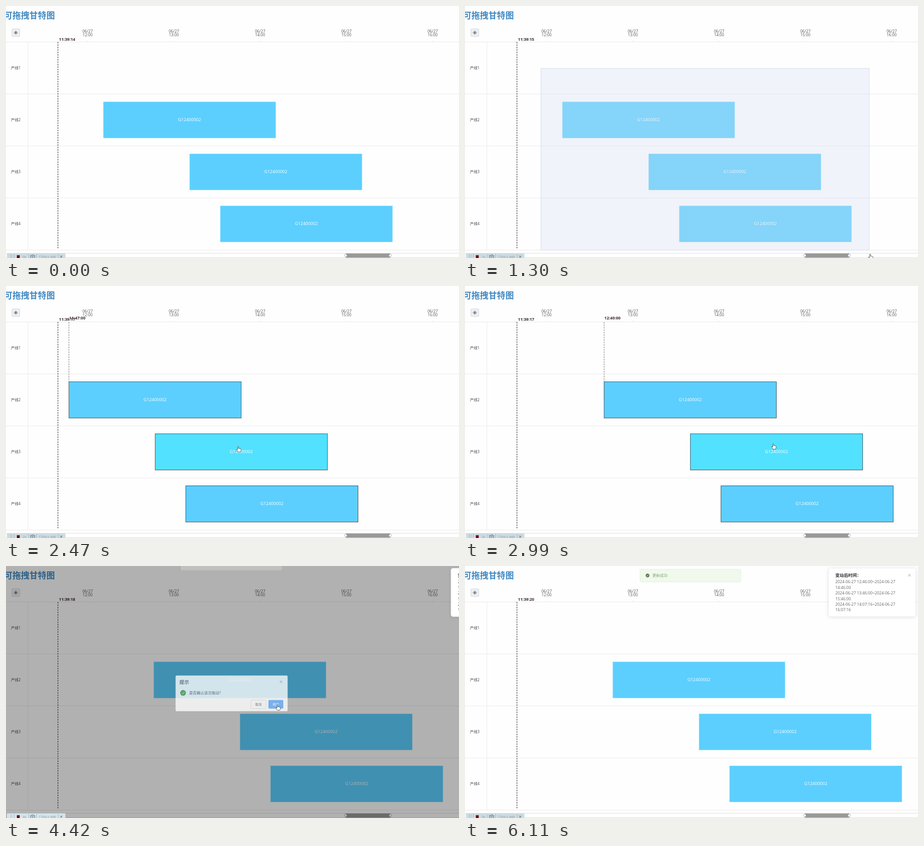
Write an HTML page that moves like this. It is 1003 px wide and 558 px high and loops after 6.24 s.

```html
<!DOCTYPE html>
<html lang="zh">
<head>
<meta charset="utf-8">
<title>可拖拽甘特图</title>
<style>
  html, body { margin: 0; width: 100%; height: 100%; overflow: hidden; background: #fefefe; }
  svg { display: block; width: 100vw; height: 100vh; }
  text { font-family: "Open Sans", "Noto Sans CJK SC", "Noto Sans CJK", sans-serif; }
  .mid { text-anchor: middle; }
  .bold { font-weight: 700; }
</style>
</head>
<body>
<svg id="stage" viewBox="0 0 1003 558" preserveAspectRatio="none"></svg>
<script>
const LOOP = 6240, STEP = 130;
const HOUR = 191, NOON = 180.7;
const ROWS = [79.5, 194.7, 309.8, 425, 540.5];
const BARS = [0, 60, 81.27];          // minutes after the first bar
const START = 11;                     // first bar begins at 12:11
const BAR_W = 381.4, BAR_H = 80.2;
const BRUSH = { x: 168, y: 138, bottom: 540.5 };

const clamp = v => Math.max(0, Math.min(1, v));
const smooth = v => { const p = clamp(v); return p * p * (3 - 2 * p); };
const easeOut = v => 1 - (1 - clamp(v)) ** 2;
const between = (t, a, b) => t >= a && t < b;
const minuteX = m => NOON + m * HOUR / 60;
const pad = n => String(n).padStart(2, '0');

// Keys are [time, value, value...]
function track(keys, t) {
  const next = keys.findIndex(k => k[0] > t);
  if (next === 0) return keys[0].slice(1);
  if (next < 0) return keys[keys.length - 1].slice(1);
  const a = keys[next - 1], b = keys[next];
  const p = smooth((t - a[0]) / (b[0] - a[0]));
  return a.slice(1).map((v, i) => v + (b[i + 1] - v) * p);
}

const text = (x, y, size, fill, str, cls = '', id = '') =>
  `<text x="${x}" y="${y}" font-size="${size}" fill="${fill}" class="${cls}" id="${id}">${str}</text>`;
const rect = (x, y, w, h, fill, more = '') =>
  `<rect x="${x}" y="${y}" width="${w}" height="${h}" fill="${fill}" ${more}/>`;
const path = (d, stroke, more = '') =>
  `<path d="${d}" fill="none" stroke="${stroke}" ${more}/>`;
const cross = (x, y, r, color) =>
  path(`M${x - r} ${y - r}l${2 * r} ${2 * r}m0 ${-2 * r}l${-2 * r} ${2 * r}`, color, 'stroke-width=".9"');
const check = (x, y, r, fill, id = '') =>
  `<circle id="${id}" cx="${x}" cy="${y}" r="${r}" fill="${fill}"/>` +
  path(`M${x - r * .42} ${y}l${r * .32} ${r * .34}l${r * .55} ${-r * .62}`, '#fff', 'stroke-width="1"');

function chart() {
  const hours = [12, 13, 14, 15, 16].map((h, i) => {
    const x = NOON + i * HOUR;
    return text(x, 58.8, 8.7, '#555', '06/27', 'mid') +
      text(x, 67.3, 8.7, '#555', h + ':00', 'mid') +
      path(`M${x} 77v2.5`, '#e0e2e8');
  }).join('');
  const lines = ROWS.map(y => path(`M0 ${y}H1003`, '#e8e9ed')).join('');
  const labels = [1, 2, 3, 4].map(n =>
    text(11, (ROWS[n - 1] + ROWS[n]) / 2 + 2.4, 8.2, '#444', '产线' + n)).join('');
  return text(-4.5, 28, 18.8, '#4189c2', '可拖拽甘特图', 'bold') +
    rect(13, 50.5, 17.5, 17, '#eceff3', 'rx="1.5" stroke="#d3d7dd"') +
    '<circle cx="21.7" cy="59" r="2.9" fill="none" stroke="#555" stroke-width=".8"/>' +
    '<circle cx="21.7" cy="59" r="1.5" fill="#444"/>' +
    path('M21.7 54.8v1.8m0 4.8v1.8M17.5 59h1.8m4.8 0h1.8', '#666', 'stroke-width=".8"') +
    hours + lines + path('M48.3 80V540', '#e8e9ed') + labels;
}

const bars = () => BARS.map((_, i) =>
  `<g id="bar${i}">${rect(0, 0, BAR_W, BAR_H, '#5ccfff')}` +
  text(BAR_W / 2, 42.7, 9.6, '#fff', 'G12400002', 'mid') + '</g>').join('');

const slider = () =>
  rect(-2, 547.6, 1008, 9.6, '#fff', 'stroke="#d8dde6"') +
  rect(752, 548, 99, 9.2, '#999') +
  [752, 851].map(x => `<circle cx="${x}" cy="552.4" r="2.9" fill="#fff" stroke="#b4bac4"/>`).join('');

const dialog = () =>
  rect(375.5, 0, 248, 79, '#fff', 'rx="2.5"') +
  text(384, 18.6, 10.7, '#303133', '提示') + cross(609, 13.8, 2.7, '#909399') +
  check(392, 38.4, 6.4, '#67a84e') + text(405.5, 41.2, 8.3, '#606266', '是否确认该次拖动?') +
  rect(542.5, 54.5, 33, 18.6, '#fff', 'rx="2" stroke="#dcdfe6"') +
  text(559, 66.4, 7.1, '#606266', '取消', 'mid') +
  rect(581, 54.2, 33, 19, '#66b1ff', 'rx="2"') + text(597.5, 66.4, 7.1, '#fff', '确定', 'mid');

const recorder = () =>
  rect(2, 547.6, 129.5, 11, '#cddbe2') +
  path('M10 551v8m3.2 -8v8', '#8795a0', 'stroke-width="1.2" stroke-dasharray="1.2 1.8"') +
  path('M18.5 549v9M50.5 549v9M67.5 549v9M115.5 549v9', '#a9b8c2') +
  rect(24, 551.8, 6.4, 6.5, '#6b0a16') +
  text(37, 558, 7.5, '#8b979f', '', '', 'seconds') +
  path('M54.5 552.5h2.2l1-1.5h2.6l1 1.5h2.2v6h-9z', '#55748c', 'stroke-width="1.1"') +
  '<circle cx="59" cy="555.3" r="1.8" fill="none" stroke="#55748c"/>' +
  text(72.5, 558, 7.5, '#8b979f', '1704 x 948') + cross(122.3, 555, 2.3, '#34495a');

const message = () =>
  rect(387.5, 7.2, 223.2, 28, '#f0f9eb', 'rx="2" stroke="#e1f3d8"') +
  check(404.2, 21, 4.2, '#667362') + text(415, 24, 8.3, '#777', '更新成功', '', 'messageText');

function notice() {
  const day = '2024-06-27 ';
  const spans = [['12:46:00', '14:46:00'], ['13:46:00', '15:46:00'], ['14:07:16', '16:07:16']];
  const lines = spans.map(([from, to], i) =>
    text(820, 38.4 + i * 24.8, 8.72, '#666', `${day}${from}~${day}`) +
    text(820, 50.8 + i * 24.8, 8.72, '#666', to)).join('');
  return rect(805, 5, 193, 107, '#fff', 'rx="4.5" stroke="#ebeef5" filter="url(#shadow)"') +
    text(820, 23.8, 9.5, '#303133', '变动后时间：', 'bold') + cross(984, 20.5, 2.7, '#909399') + lines;
}

const dashes = 'stroke-dasharray="3.4 2"';
const stage = document.getElementById('stage');
stage.innerHTML =
  '<defs><filter id="shadow" x="-10%" y="-15%" width="120%" height="130%">' +
  '<feDropShadow dx="0" dy="1" stdDeviation="3.2" flood-color="#000" flood-opacity=".13"/></filter></defs>' +
  rect(0, 0, 1003, 558, '#fefefe') + chart() + bars() + slider() +
  path('M115 79.5V538.5', '#444', 'stroke-width="1.3" ' + dashes) +
  text(117.3, 77.4, 9, '#3a2930', '', 'bold', 'clock') +
  '<g id="guide">' + path('M0 80V252', '#777', 'stroke-width="1.1" ' + dashes) +
  text(.5, 74.3, 9, '#3a2930', '', 'bold', 'guideTime') + '</g>' +
  rect(BRUSH.x, BRUSH.y, 0, 0, '#d2dbee', 'id="brush" fill-opacity=".34" stroke="#d2dbee"') +
  rect(0, 0, 1003, 558, '#000', 'id="modal"') +
  `<g id="dialog">${dialog()}</g><g id="recorder">${recorder()}</g>` +
  `<g id="message">${message()}</g><g id="notice">${notice()}</g>` +
  '<path id="cursor" stroke-width=".9" stroke-linejoin="round"/>';

const el = {};
stage.querySelectorAll('[id]').forEach(node => { if (node.id) el[node.id] = node; });
const set = (node, attrs) => { for (const k in attrs) node.setAttribute(k, attrs[k]); };
const show = (node, on) => set(node, { visibility: on ? 'visible' : 'hidden' });

const HAND = 'M-1 1Q0-.8 1 1V5Q2 4 3 5Q4 4.3 4.8 5.4Q6 5 6.2 6.5V9.5Q6 11 5 12.5H0L-3.6 8Q-4 6.3-2.5 6.7L-1 8Z';
const ARROW = 'M0 0V9.2L2.1 7.3L3.6 10.6L5 10L3.5 6.8H6.3Z';

const dragKeys = [[1820, 0], [2470, -24], [3120, 35]];
const cursorKeys = [
  [0, 27, 560], [390, 168, 138], [1235, 897, 549], [1300, 897, 549], [1690, 590, 357],
  [1820, 590, 357], [2470, 514, 355], [3120, 702, 348], [3380, 716, 346], [3770, 716, 346],
  [4290, 601, 307], [4550, 601, 307], [4940, 589, 315], [5200, 589, 315], [5900, 27, 560]
];

function drawBars(t) {
  const begin = START + Math.round(track(dragKeys, t)[0]);
  const selected = between(t, 1430, 3250);
  BARS.forEach((delay, i) => {
    const bar = el['bar' + i], box = bar.firstChild;
    const held = i === 1 && between(t, 1690, 3250);
    const hovered = i === 1 && between(t, 3250, 3900);
    set(bar, { transform: `translate(${minuteX(begin + delay)} ${ROWS[i + 1] + 17.4})` });
    set(box, {
      fill: held ? '#52e1ff' : hovered ? '#46bae8' : '#5ccfff',
      stroke: selected ? '#3c5866' : hovered ? '#5a8ea5' : '#a9e3fb',
      'stroke-width': selected ? 1.1 : .6
    });
  });
  show(el.guide, between(t, 1950, 3250));
  set(el.guide, { transform: `translate(${minuteX(begin)} 0)` });
  const total = 720 + begin;
  el.guideTime.textContent = `${Math.floor(total / 60)}:${pad(total % 60)}:00`;
}

function drawCursor(t, x, y) {
  const hand = between(t, 1250, 3250) || between(t, 4200, 4700);
  show(el.cursor, between(t, 130, 5900));
  set(el.cursor, {
    d: hand ? HAND : ARROW, fill: '#fff', stroke: '#444',
    transform: `translate(${x} ${y})`
  });
}

function render(t) {
  const [x, y] = track(cursorKeys, t);
  el.clock.textContent = '11:39:' + (14 + Math.floor((t + 700) / 1040));
  el.seconds.textContent = Math.floor(t / 1040) + 's';
  drawBars(t);

  show(el.brush, between(t, 391, 1430));
  set(el.brush, {
    width: Math.max(0, Math.min(x - 2, 895) - BRUSH.x),
    height: Math.max(0, Math.min(y, BRUSH.bottom) - BRUSH.y)
  });

  const closing = clamp((t - 4350) / 300);
  const opacity = t < 3290 ? 0 : easeOut((t - 3290) / 300) * (1 - closing);
  const shade = t < 3290 ? 0 : clamp((t - 3290) / 200) * (1 - clamp((t - 4350) / 180));
  set(el.modal, { opacity: shade * .5 });
  set(el.dialog, { opacity, transform: `translate(0 ${245.3 - 11.8 * (1 - opacity)})` });
  set(el.recorder.firstChild, { fill: shade > .2 ? '#d3e4ec' : '#cddbe2' });

  const slide = smooth((t - 4373) / 300);
  show(el.notice, slide > 0);
  set(el.notice, { transform: `translate(${193 * (1 - slide)} 0)` });
  show(el.message, slide > 0);
  set(el.message, {
    opacity: clamp((t - 4350) / 300),
    transform: `translate(0 ${-28 * (1 - slide)})`
  });
  set(el.messageText, { fill: t < 5700 ? '#757b71' : '#7fa873' });
  drawCursor(t, x, y);
}

const origin = performance.now();
function frame() {
  const t = (performance.now() - origin) % LOOP;
  render(Math.floor(t / STEP) * STEP);
  requestAnimationFrame(frame);
}
frame();
</script>
</body>
</html>
```
